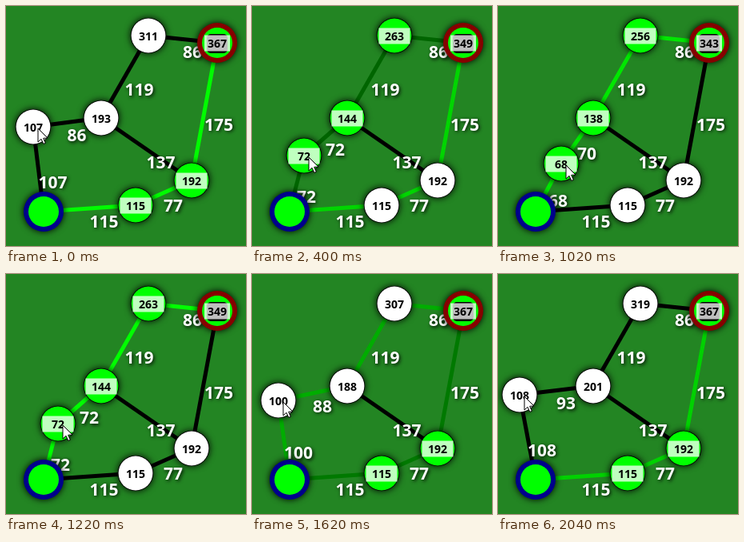
Animation, 300 px wide and 300 px high, one loop 2.24 s. Source, as an HTML page with a canvas:

```html
<!DOCTYPE html>
<html lang="en">
<head>
<meta charset="utf-8">
<title>Shortest path</title>
<style>
  html, body { margin: 0; width: 100%; height: 100%; overflow: hidden; background: #238523; }
  canvas { display: block; width: 300px; height: 300px; }
</style>
</head>
<body>
<canvas id="stage"></canvas>
<script>
(() => {
  const canvas = document.getElementById('stage');
  const ctx = canvas.getContext('2d');
  const ratio = window.devicePixelRatio || 1;
  canvas.width = canvas.height = 300 * ratio;

  const FONT = '"Noto Sans", "Open Sans", sans-serif';
  const LIME = '#00ff00';
  const LOOP = 2240;

  const start = { x: 47, y: 257 };
  const drag = { x: 34, y: 151 };
  const hub = { x: 119, y: 140 };
  const peak = { x: 178, y: 37 };
  const goal = { x: 264, y: 46 };
  const right = { x: 232, y: 218 };
  const low = { x: 162, y: 249 };
  const upperRoute = [start, drag, hub, peak, goal];
  const lowerRoute = [start, low, right, goal];

  // The picture is refreshed only at these times.
  const ticks = [0, 200, 400, 600, 820, 1020, 1220, 1420, 1620, 1840, 2040];

  // The drag is a closed smooth curve through these points.
  const dragKeys = [
    { t: 0, x: 34, y: 151 },
    { t: 400, x: 65, y: 187 },
    { t: 600, x: 82, y: 198 },
    { t: 1020, x: 79, y: 197 },
    { t: 1420, x: 47, y: 173 },
    { t: 1620, x: 33, y: 158 },
    { t: 2040, x: 27, y: 151 }
  ];

  // Moments at which the shorter route changes
  const TO_UPPER = 300;
  const TO_LOWER = 1425;

  const dist = (a, b) => Math.hypot(a.x - b.x, a.y - b.y);
  const wrap = t => (t + LOOP) % LOOP;

  function keyAt(i) {
    const n = dragKeys.length;
    const key = dragKeys[(i + n) % n];
    return { ...key, t: key.t + Math.floor(i / n) * LOOP };
  }

  function dragAt(time) {
    const i = dragKeys.findLastIndex(k => k.t <= time);
    const [before, a, b, after] = [-1, 0, 1, 2].map(d => keyAt(i + d));
    const span = b.t - a.t;
    const u = (time - a.t) / span;
    const curve = axis => {
      const slopeA = (b[axis] - before[axis]) / (b.t - before.t) * span;
      const slopeB = (after[axis] - a[axis]) / (after.t - a.t) * span;
      const ease = u * u * (3 - 2 * u);
      return a[axis] + (b[axis] - a[axis]) * ease
        + slopeA * u * (1 - u) ** 2 - slopeB * u * u * (1 - u);
    };
    return { x: Math.round(curve('x')), y: Math.round(curve('y')) };
  }

  // Edges brighten slowly when their route wins and darken faster when it loses.
  function edgeColor(time, wins, loses) {
    const lit = wrap(time - wins);
    const dim = wrap(time - loses);
    const value = lit < dim
      ? Math.min(255, 80 + 0.21 * lit)
      : Math.max(0, 255 - 0.42 * dim);
    return `rgb(0,${Math.round(value)},0)`;
  }

  function measure(route) {
    let sum = 0;
    route.forEach((node, i) => {
      if (i) sum += dist(route[i - 1], node);
      node.total = sum;
    });
    return sum;
  }

  function shadow(color, blur, offset) {
    ctx.shadowColor = color;
    ctx.shadowBlur = blur * ratio;
    ctx.shadowOffsetX = ctx.shadowOffsetY = offset * ratio;
  }

  const noShadow = () => shadow('transparent', 0, 0);

  function edge(a, b, color) {
    ctx.strokeStyle = color;
    ctx.lineWidth = 5;
    ctx.beginPath();
    ctx.moveTo(a.x, a.y);
    ctx.lineTo(b.x, b.y);
    ctx.stroke();
  }

  function edgeLabel(a, b) {
    ctx.font = `bold 21px ${FONT}`;
    ctx.textAlign = 'left';
    ctx.fillStyle = '#fff';
    shadow('rgba(0,0,0,.85)', 4, 1.5);
    ctx.fillText(Math.round(dist(a, b)), (a.x + b.x) / 2, (a.y + b.y) / 2 + 23.5);
    noShadow();
  }

  function disc(node, radius, color) {
    ctx.fillStyle = color;
    ctx.beginPath();
    ctx.arc(node.x, node.y, radius, 0, Math.PI * 2);
    ctx.fill();
  }

  function base(node, radius, rim, inner, fill) {
    shadow('#000', 9, 0);
    disc(node, radius, rim);
    noShadow();
    disc(node, inner, fill);
  }

  function band(node, width) {
    ctx.fillStyle = 'rgba(255,255,255,.75)';
    ctx.fillRect(node.x - width / 2, node.y - 9.5, width, 20);
  }

  function total(node) {
    ctx.font = `bold 14px ${FONT}`;
    ctx.textAlign = 'center';
    ctx.fillStyle = '#000';
    ctx.fillText(Math.round(node.total), node.x, node.y + 6);
  }

  function stop(node, active) {
    base(node, 22.3, '#000', 21.4, active ? LIME : '#fff');
    if (active) band(node, 39);
    total(node);
  }

  function goalNode() {
    base(goal, 25, '#860000', 19, LIME);
    ctx.fillStyle = '#000';
    ctx.beginPath();
    ctx.roundRect(goal.x - 13, goal.y - 11, 26, 24, 5);
    ctx.fill();
    band(goal, 32);
    total(goal);
  }

  function pointer(x, y) {
    const outline = [[0, 0], [0, 17], [4, 13.3], [6.8, 19.4], [9.4, 18.3], [6.7, 12.3], [12, 12]];
    ctx.beginPath();
    outline.forEach(([dx, dy]) => ctx.lineTo(x + dx, y + dy));
    ctx.closePath();
    ctx.fillStyle = '#fff';
    ctx.strokeStyle = '#000';
    ctx.lineWidth = 1;
    ctx.fill();
    ctx.stroke();
  }

  function draw(time) {
    Object.assign(drag, dragAt(time));
    const upper = measure(upperRoute);
    const lower = measure(lowerRoute);
    goal.total = Math.min(upper, lower);
    const active = upper < lower ? upperRoute : lowerRoute;

    ctx.setTransform(ratio, 0, 0, ratio, 0, 0);
    ctx.fillStyle = '#238523';
    ctx.fillRect(0, 0, 300, 300);

    const edges = [[hub, right, '#000']];
    const addRoute = (route, color) =>
      route.slice(1).forEach((node, i) => edges.push([route[i], node, color]));
    addRoute(upperRoute, edgeColor(time, TO_UPPER, TO_LOWER));
    addRoute(lowerRoute, edgeColor(time, TO_LOWER, TO_UPPER));
    edges.forEach(([a, b, color]) => edge(a, b, color));
    edges.forEach(([a, b]) => edgeLabel(a, b));

    base(start, 25, '#00008b', 19, LIME);
    goalNode();
    [hub, peak, right, low, drag].forEach(node => stop(node, active.includes(node)));
    pointer(drag.x + 6, drag.y + 2);
  }

  function play() {
    const now = performance.now() % LOOP;
    draw(ticks.findLast(t => t <= now));
    requestAnimationFrame(play);
  }
  play();
})();
</script>
</body>
</html>
```
